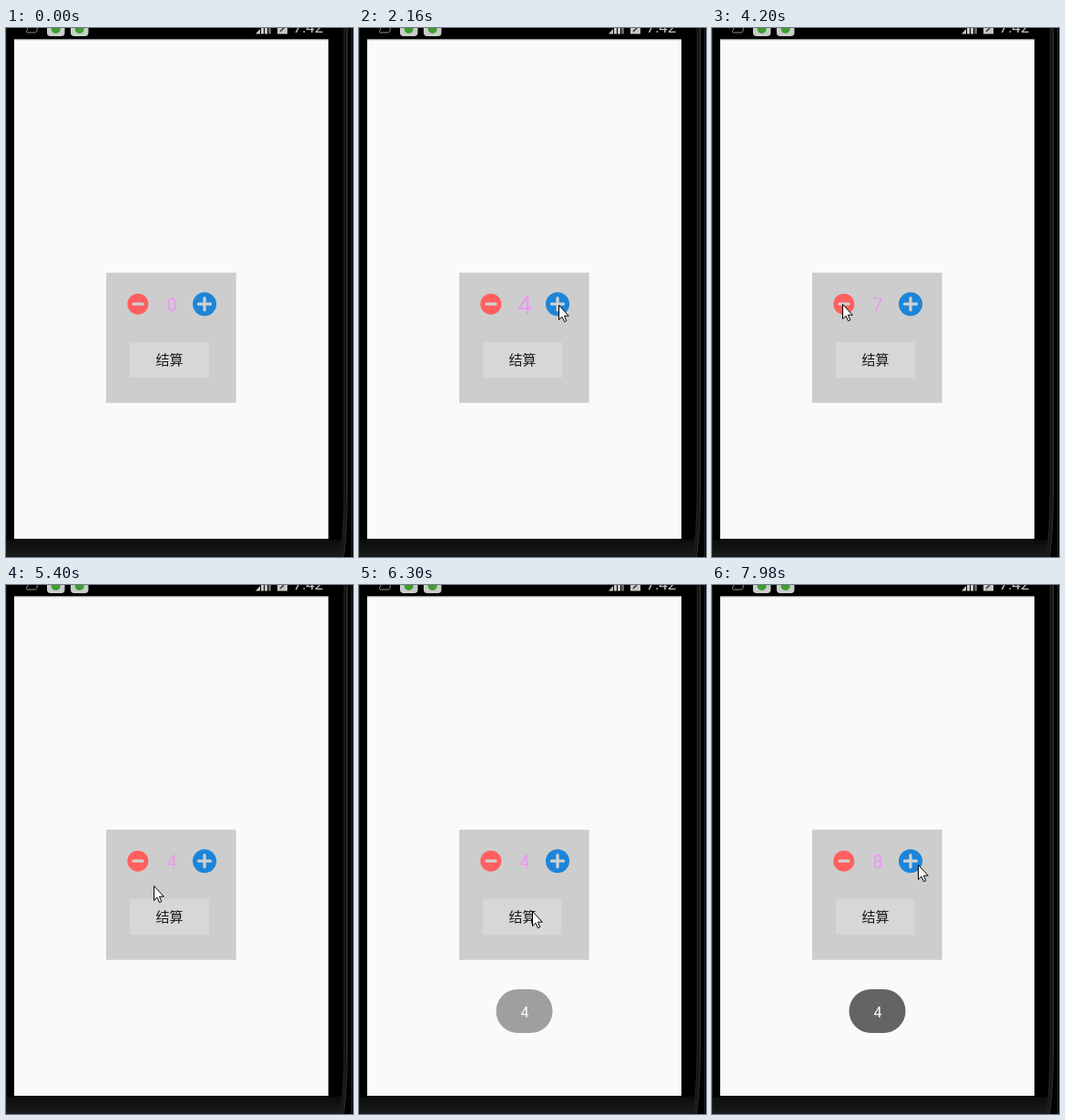
Animation of 381 by 581 pixels, one loop 8 s. Source, as an HTML page:

```html
<!DOCTYPE html>
<html lang="zh">
<head>
<meta charset="utf-8">
<title>Counter</title>
<style>
  html, body { margin: 0; width: 100%; height: 100%; overflow: hidden; background: #000; }
  svg { display: block; width: 381px; height: 581px; }
  text { font-family: Roboto, "Noto Sans", sans-serif; text-anchor: middle; }
  .cjk { font-family: "Noto Sans CJK SC", "Noto Sans CJK", sans-serif; font-weight: 500; }
</style>
</head>
<body>
<svg viewBox="0 0 381 581">
  <defs>
    <linearGradient id="chin" x2="0" y2="1">
      <stop offset="0" stop-color="#0c0c0c"/>
      <stop offset="1" stop-color="#1b1b1b"/>
    </linearGradient>
  </defs>

  <!-- phone body -->
  <rect width="381" height="581"/>
  <rect y="562" width="368" height="19" fill="url(#chin)"/>
  <path d="M.5 0V581" stroke="#1c1c1c"/>
  <path d="M372 0V510Q372 550 368 581" fill="none" stroke="#1b1b1b" stroke-width="3"/>
  <path d="M374.500 0V510Q374.500 550 370.500 581" fill="none" stroke="#3a3a3a"/>
  <path d="M379.500 0V581" stroke="#202020"/>

  <!-- status bar -->
  <path d="M24 0L22.500 3.500Q22 5 23.500 5H32.500Q34 5 34.500 0" fill="none" stroke="#8c8c8c"/>
  <g id="tile">
    <rect x="45" y="-10" width="19.500" height="19" rx="4" fill="#c9cdca"/>
    <circle cx="54.700" cy="1" r="5" fill="#3f9d2f"/>
  </g>
  <use href="#tile" x="26"/>
  <path d="M274 6.500L279 1V6.500ZM280 0H283V6.500H280ZM284 0H287V6.500H284Z" fill="#c8c8c8"/>
  <path d="M288 0H291V6.500H288Z" fill="#666"/>
  <path d="M298 0H309V6.500H298Z" fill="#c8c8c8"/>
  <path d="M301 4L305 0" stroke="#333" stroke-width="1.500"/>
  <text x="332" y="5" font-size="17" fill="#c4c4c4">7:42</text>

  <!-- app -->
  <rect x="9" y="12" width="345" height="549" fill="#fafafa"/>
  <path d="M9 12.500H354" stroke="#999"/>
  <path d="M9 13.500H354" stroke="#e4e4e4"/>
  <rect x="110" y="268.700" width="142.700" height="143" fill="#cccdcc"/>
  <circle cx="144.800" cy="303.200" r="11.500" fill="#ff605f"/>
  <circle cx="218" cy="303.200" r="13" fill="#1c85d9"/>
  <path d="M140 303.200H150M211.500 303.200H224.500M218 296.700V309.700" stroke="#d0d1d0" stroke-width="3.200" stroke-linecap="round"/>
  <text id="digit" y="7.200" font-size="19.500" fill="#ee96f5"></text>
  <rect id="button" x="136" y="345" width="87" height="39" fill="#d6d8d7"/>
  <text class="cjk" x="179.500" y="370" font-size="15" fill="#1c1c1c">结算</text>
  <g id="toast">
    <rect x="150.500" y="444" width="62" height="48" rx="24" fill="#646464"/>
    <text x="182" y="475" font-size="16" fill="#fff">4</text>
  </g>
  <path id="cursor" d="M.5 .5V16.500L4 13.200L6.500 18.700L8.800 17.700L6.400 12.200H11.300Z" fill="#fff" stroke="#000"/>
</svg>
<script>
const LOOP = 8000, STEP = 60, POP = 420, ENTER = 120, RELEASE = 6060;
const $ = id => document.getElementById(id);
const set = (id, attrs) => Object.entries(attrs).forEach(([k, v]) => $(id).setAttribute(k, v));
const ramp = (t, from, length) => Math.max(0, Math.min(1, (t - from) / length));
const ease = k => k * k * (3 - 2 * k);

const moves = [
  { at: ENTER, time: 540, x: 222, y: 305 },
  { at: 1560, time: 120, x: 219, y: 304 },
  { at: 3600, time: 600, x: 143, y: 303 },
  { at: 5160, time: 540, x: 188, y: 360 },
  { at: 6240, time: 420, x: 225, y: 308 },
  { at: 7680, time: 60, x: 226, y: 307 }
];

// runs of clicks on plus (+1) and minus (-1)
const runs = [
  { at: 840, gap: 240, clicks: 3, by: 1 },
  { at: 1980, gap: 400, clicks: 4, by: 1 },
  { at: 4620, gap: 270, clicks: 3, by: -1 },
  { at: 6840, gap: 380, clicks: 4, by: 1 }
];

// each move eases to its stop and sags a little on the way
function pointer(t) {
  let x = 334, y = 162;
  for (const m of moves) {
    const k = ease(ramp(t, m.at, m.time)), dx = m.x - x;
    x += dx * k;
    y += (m.y - y) * k + Math.abs(dx) * .08 * Math.sin(Math.PI * k);
  }
  return [Math.round(x), Math.round(y)];
}

function counter(t) {
  let value = 0, scale = 1;
  for (const { at, gap, clicks, by } of runs) {
    if (t < at) break;
    const done = Math.min(clicks, Math.floor((t - at) / gap) + 1);
    const age = t - at - (done - 1) * gap;
    value += by * done;
    scale = by > 0 ? 1 + .4 * Math.sin(Math.PI * ramp(age, 0, POP)) : 1;
  }
  return { value, scale };
}

function draw(now) {
  const t = Math.floor(now % LOOP / STEP) * STEP;
  const { value, scale } = counter(t);
  const clicked = t >= RELEASE;

  $("digit").textContent = value;
  set("digit", { transform: `translate(182 304) scale(${scale})` });
  set("button", { rx: clicked ? 1.5 : 0, width: clicked ? 86.5 : 87 });
  set("toast", { opacity: ramp(t, RELEASE + 60, 300) });
  set("cursor", {
    visibility: t < ENTER ? "hidden" : "visible",
    transform: `translate(${pointer(t)})`
  });
}

const begin = performance.now();
function tick() {
  draw(performance.now() - begin);
  requestAnimationFrame(tick);
}
tick();
</script>
</body>
</html>
```
